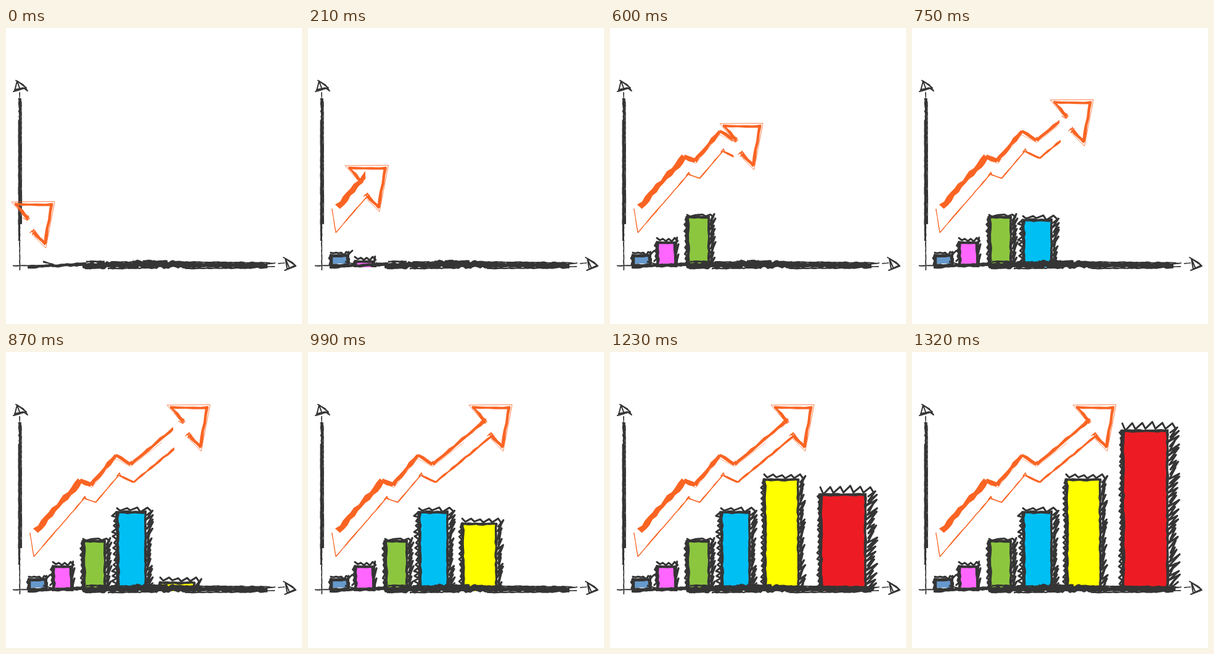
These frames come from a looping animation (480x480 px, 1800 ms). An HTML page with a canvas:

```html
<!DOCTYPE html>
<html lang="en">
<head>
<meta charset="utf-8">
<title>Growth chart</title>
<style>
  html, body { margin: 0; width: 100%; height: 100%; overflow: hidden; background: #fff; }
  canvas { display: block; width: 480px; height: 480px; }
</style>
</head>
<body>
<canvas id="stage" width="480" height="480"></canvas>
<script>
const ctx = document.getElementById('stage').getContext('2d');
const LOOP = 1800, STEP = 30, LAST = 44;
const INK = '#353535', ORANGE = '#fa6423', PALE = '#fcae88';
const FLOOR = 388, BASE = 380;

let seed = 7;
function rand() {
  seed = (seed * 1664525 + 1013904223) >>> 0;
  return seed / 4294967296;
}
const vary = a => (rand() * 2 - 1) * a;

function poly(points, closed) {
  const p = new Path2D();
  points.forEach(([x, y], i) => i ? p.lineTo(x, y) : p.moveTo(x, y));
  if (closed) p.closePath();
  return p;
}

// Filled line with ragged edges.
function rough(x1, y1, x2, y2, w, gap = 4) {
  const len = Math.hypot(x2 - x1, y2 - y1), n = Math.max(2, Math.round(len / gap));
  const nx = (y1 - y2) / len, ny = (x2 - x1) / len, a = [], b = [];
  for (let i = 0; i <= n; i++) {
    const k = i / n, x = x1 + (x2 - x1) * k, y = y1 + (y2 - y1) * k;
    const u = w * (.3 + rand() * .4), v = w * (.3 + rand() * .4);
    a.push([x + nx * u, y + ny * u]);
    b.unshift([x - nx * v, y - ny * v]);
  }
  return poly(a.concat(b), true);
}

function fill(path, color) {
  ctx.fillStyle = color;
  ctx.fill(path);
}

function stroke(path, color, w) {
  ctx.strokeStyle = color;
  ctx.lineWidth = w;
  ctx.stroke(path);
}

const axes = [
  rough(22, 104, 22, 118, 1.5), rough(22.5, 114, 23, 318, 4.5, 3),
  rough(20.5, 150, 20.5, 330, 1.6, 5), rough(25, 120, 25.5, 318, 1.2, 6),
  rough(21.5, 235, 21.5, 345, 3, 3), rough(22, 318, 22.5, 393, 1.8),
  rough(11, 385.5, 130, 384.5, 2), rough(35, 388, 78, 384, 4.5, 5),
  rough(60, 379, 76, 383, 2.5), rough(74, 386, 130, 383, 5, 5),
  rough(124, 385, 215, 384, 10, 4), rough(130, 379, 160, 379, 3),
  rough(128, 390, 152, 389, 3), rough(205, 383, 295, 384, 11, 4),
  rough(222, 378, 262, 379, 4), rough(170, 379, 215, 380, 2),
  rough(165, 390, 245, 389, 2.5), rough(285, 384, 424, 385, 9, 4),
  rough(270, 379, 345, 380, 2.4), rough(290, 390, 400, 389, 2.4),
  rough(350, 380, 428, 381, 2), rough(420, 383, 437, 381, 2),
  rough(420, 387, 436, 387, 1.6), rough(441, 382, 452, 381, 1.4)
];
const tips = [
  [[18, 86], [14, 102], [33, 97], [18, 86], [23, 100], [12, 103]],
  [[16, 85], [28, 92], [35, 102], [28, 97], [14, 100]],
  [[453, 374], [456, 391], [469, 385], [453, 374], [459, 388]],
  [[450, 372], [464, 380], [470, 386], [452, 393]]
].map(p => poly(p));

// left, right and top of the colour, side depth, scribble height, left teeth, first and last step
const bars = [
  [40, 62, 371, 5, 9, 3, 0, 4, '#6699cc'],
  [79, 103, 350, 8, 11, 4, 4, 12, '#ff66ff'],
  [128, 158, 309, 13, 8, 5, 12, 20, '#8cc63f'],
  [183, 224, 262, 14, 12, 8, 20, 28, '#00bff3'],
  [253, 303, 209, 14, 12, 5, 28, 36, '#ffff00'],
  [344, 412, 130, 22, 18, 5, 36, 44, '#ed1c24']
].map(makeBar);

function makeBar([x0, x1, top, depth, rise, teeth, from, to, color]) {
  const left = [], crest = [], side = [];
  for (let y = top - 3; y < BASE; y += 9) {
    left.push([x0 - 3, y], [x0 - 3 - teeth * (.5 + rand() * .6), y + 5 + vary(2)]);
  }
  const n = Math.max(3, Math.round((x1 - x0) / 13));
  for (let i = 0; i <= n; i++) {
    const x = x0 - 3 + (x1 - x0 + depth * .6) * i / n;
    crest.push([x, top - rise * (.8 + rand() * .2) + 1], [x + 5, top - 4 + vary(2)]);
  }
  for (let y = top - rise * .3; y < BASE + 5; y += 7.5) {
    side.push([x1 + 3 + rand() * depth * .2, y + 6], [x1 + depth * (.65 + rand() * .38), y - 4 + vary(3)]);
  }
  const solid = [
    rough(x0 - 2.5, top - 4, x0 - 1.5, BASE + 7, 5.5, 6),
    rough(x0 - 4, top - 2, x1 + 4, top - 2, 4.6, 6),
    rough(x1 + 2, top - 2, x1 + 2.5, BASE + 6, 4, 6),
    rough(x0 - 4, BASE + 5, x1 + depth * .7, BASE + 5, 5, 5)
  ];
  const lines = [left, crest, side].map(p => poly(p));
  if (!from) lines.push(poly([[62, 370], [72, 361]]));
  return { x0, x1, top, from, to, color, solid, lines, travel: FLOOR - top + rise };
}

function drawBar(b, n) {
  if (n <= b.from) return;
  const k = Math.min(1, (n - b.from) / (b.to - b.from));
  ctx.save();
  ctx.beginPath();
  ctx.rect(0, 0, 480, FLOOR);
  ctx.clip();
  ctx.translate(0, b.travel * (1 - k));
  ctx.fillStyle = b.color;
  ctx.fillRect(b.x0 - 1, b.top - 1, b.x1 - b.x0 + 2, BASE + 3 - b.top);
  b.solid.forEach(p => fill(p, INK));
  b.lines.forEach(p => stroke(p, INK, 3));
  ctx.restore();
}

const upper = [[48, 290], [121, 209], [138, 216], [178, 167], [202, 182], [286, 112]];
const lower = [[45, 332], [127, 237], [145, 244], [183, 200], [207, 211], [297, 137]];
const thick = [9, 7, 6.5, 5.5, 5], thin = [1.8, 2, 2, 2.8, 3.4];
const segments = (pts, widths) =>
  widths.map((w, i) => rough(...pts[i], ...pts[i + 1], w, 9));
const ribbon = [...segments(upper, thick), ...segments(lower, thin),
  rough(39, 293, 45, 332, 1.3, 12)];
const shade = poly([[124, 212], [139, 220], [178, 173], [202, 186], [252, 147]]);
const nubs = [[127, 237], [183, 199], [202, 180], [121, 209]];

function drawRibbon(n) {
  const edge = 32 + 8.4 * n;
  ctx.save();
  ctx.clip(poly([[0, 0], [edge - 12, 0], [edge + 12, 400], [0, 400]], true));
  stroke(shade, PALE, 1);
  ribbon.forEach(p => fill(p, ORANGE));
  nubs.forEach(([x, y]) => stroke(poly([[x - 3, y + 2], [x + 1, y - 3], [x + 3, y + 2]]), ORANGE, 1.5));
  ctx.restore();
}

// The neck of the head runs along the upper line: step, x, y
const route = [[0, 33, 308], [12, 121, 207], [13, 138, 215], [18, 178, 166],
  [20, 202, 181], [29, 285, 112]];

function neck(n) {
  const i = route.findIndex(r => r[0] >= n);
  if (i < 0) return route[route.length - 1].slice(1);
  if (!i) return route[0].slice(1);
  const a = route[i - 1], b = route[i], k = (n - a[0]) / (b[0] - a[0]);
  return [a[1] + (b[1] - a[1]) * k, a[2] + (b[2] - a[2]) * k];
}

// Head parts, measured from its upper right corner.
const head = [
  rough(-63, 4, -44, 26, 4.6, 7), rough(-65, 4.2, -3, 4.2, 4, 12),
  rough(-5, 3, -16, 68, 4.2, 12), rough(-15, 69, -34, 49, 4.6, 7)
];
const rim = poly([[-44, 30], [-70, 0], [0, -.5], [-14.5, 75], [-37, 52]]);
const knots = poly([[-51, 26], [-46, 29], [-42, 23], [-45, 30], [-41, 27],
  [-44, 22]]);
const lowKnot = poly([[-40, 50], [-34, 45], [-29, 51], [-38, 47], [-31, 47], [-36, 53], [-34, 44]]);

function drawHead(n) {
  const [x, y] = neck(n);
  ctx.save();
  ctx.translate(x + 46, y - 26);
  stroke(rim, ORANGE, .8);
  head.forEach(p => fill(p, ORANGE));
  stroke(knots, ORANGE, 1.2);
  stroke(lowKnot, ORANGE, 1.2);
  ctx.restore();
}

function draw(t) {
  const n = Math.min(LAST, Math.floor(t / STEP));
  ctx.fillStyle = '#fff';
  ctx.fillRect(0, 0, 480, 480);
  ctx.lineJoin = 'round';
  ctx.lineCap = 'round';
  bars.forEach(b => drawBar(b, n));
  axes.forEach(p => fill(p, INK));
  tips.forEach(p => stroke(p, INK, 2));
  drawRibbon(n);
  drawHead(n);
}

const start = performance.now();
function tick() {
  draw((performance.now() - start) % LOOP);
  requestAnimationFrame(tick);
}
tick();
</script>
</body>
</html>
```
